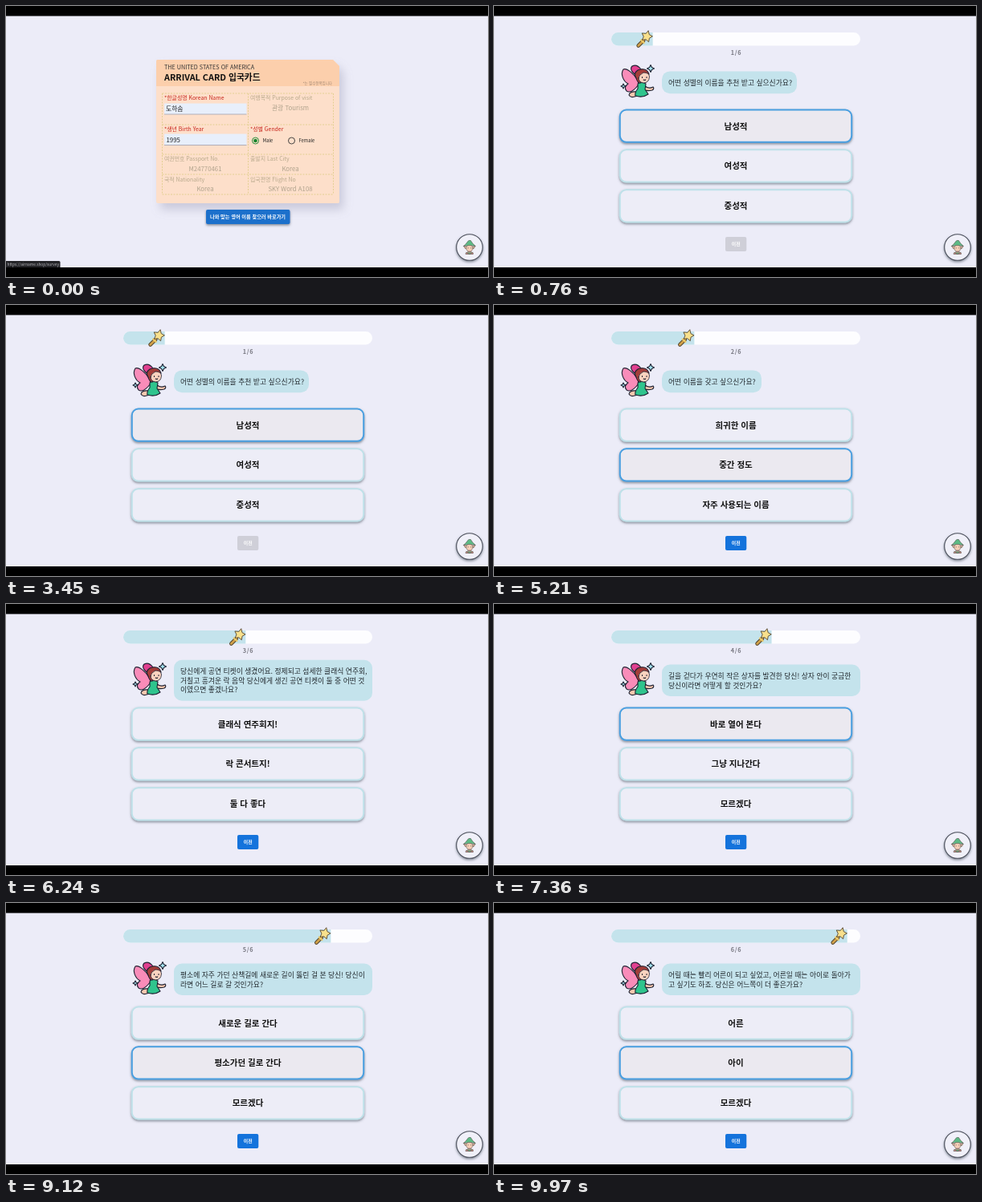
These frames come from a looping animation (600 px wide and 338 px high, 10 s). An HTML page:

```html
<!DOCTYPE html>
<html lang="ko">
<head>
<meta charset="utf-8">
<style>
  html, body { margin: 0; width: 100%; height: 100%; overflow: hidden; background: #000; }
  svg { display: block; width: 600px; height: 338px; font-family: "Noto Sans CJK KR", sans-serif; }
  .mid { text-anchor: middle; }
  .bold { font-weight: 700; }
  #card .label { font-size: 6.9px; fill: #b8a98c; }
  #card .need { fill: #c8261c; }
  #card .value { font-size: 7.8px; fill: #b0a28c; text-anchor: middle; }
  #card .typed { font-size: 7.8px; fill: #222; }
  .option rect { fill: #ededf7; stroke: #bfe1e9; stroke-width: 2; filter: url(#drop); }
  .option.hover rect { fill: #ebe9f0; stroke: #4a9fe0; }
  .option text { font-size: 10.5px; font-weight: 700; fill: #111; }
  #bubble text { font-size: 8.8px; fill: #22292e; }
  .ink { stroke: #1c2030; stroke-width: 1.1; stroke-linejoin: round; stroke-linecap: round; }
  #wand { stroke: #54452f; }
</style>
</head>
<body>
<svg viewBox="0 0 600 338">
  <defs>
    <filter id="drop" x="-10%" y="-30%" width="120%" height="170%">
      <feDropShadow dx="0" dy="1.6" stdDeviation="1.8" flood-color="#4a5560" flood-opacity=".65"/>
    </filter>
    <filter id="soft" x="-20%" y="-20%" width="140%" height="140%">
      <feDropShadow dx="5" dy="8" stdDeviation="6" flood-color="#8c8ca5" flood-opacity=".35"/>
    </filter>
    <clipPath id="track"><rect x="146" y="33" width="310" height="16.5" rx="8.2"/></clipPath>
  </defs>
  <rect y="12.5" width="600" height="313.5" fill="#ececf8"/>

  <g id="card">
    <path d="M189 67H407L415 75V244a2 2 0 0 1-2 2H189a2 2 0 0 1-2-2V69a2 2 0 0 1 2-2z" fill="#fddfca" filter="url(#soft)"/>
    <path d="M189 67H407L415 75V100H187V69a2 2 0 0 1 2-2z" fill="#fccfac"/>
    <path d="M194.5 109H407.5M194.5 148H407.5M194.5 185H407.5M194.5 210H407.5M194.5 235H407.5M194.5 109V235M301.5 109V235M407.5 109V235"
          fill="none" stroke="#dccb84" stroke-width=".8" stroke-dasharray="2 1.5"/>
    <text x="197" y="79" font-size="7.2" fill="#333">THE UNITED STATES OF AMERICA</text>
    <text x="197" y="92.5" font-size="10.8" class="bold" fill="#111">ARRIVAL CARD 입국카드</text>
    <text x="406" y="97.5" font-size="4.5" text-anchor="end" fill="#a08672">*는 필수항목입니다</text>
    <path d="M197 121.5h102.5v13.5H197zM197 159.5h102.5v14H197z" fill="#e8effb"/>
    <path d="M197 135h102.5M197 173.5h102.5" stroke="#a9a9b5" stroke-width=".9"/>
    <text class="typed" x="199" y="131.3">도하솜</text>
    <text class="typed" x="199.5" y="169.5">1995</text>
    <g fill="#fddfca" stroke="#333" stroke-width=".9">
      <circle cx="310.5" cy="168" r="4" stroke="#12852c"/>
      <circle cx="355.5" cy="168" r="4"/>
    </g>
    <circle cx="310.5" cy="168" r="2.3" fill="#12852c"/>
    <g font-size="5.8" fill="#222"><text x="319.5" y="170.3">Male</text><text x="364.5" y="170.3">Female</text></g>
    <rect x="249" y="254" width="104.5" height="18" rx="2" fill="#1a6fcb" filter="url(#drop)"/>
    <text x="301" y="265.3" class="mid bold" font-size="6.2" fill="#fff">나와 맞는 영어 이름 찾으러 바로가기</text>
    <path d="M0 318H66q1.5 0 1.5 1.5V326H0z" fill="#242428"/>
    <text x="1.5" y="323.8" font-size="4.8" fill="#b4b4b8">https://airname.shop/survey</text>
  </g>

  <g id="quiz">
    <g clip-path="url(#track)">
      <rect x="146" y="33" width="310" height="17" fill="#fdfdff"/>
      <rect id="fill" x="146" y="33" height="17" fill="#c4e3ec"/>
    </g>
    <g id="wand" class="ink">
      <path d="M-4 5L-10.5 11.5" stroke-width="4.6"/>
      <path d="M-4 5L-10.5 11.5" stroke="#d2a24a" stroke-width="2.6"/>
      <path d="M-7 4.500L-3.500 8" stroke="#eccb6a" stroke-width="2.2"/>
      <path id="star" fill="#f8e08c" stroke-width=".9"/>
    </g>
    <text id="count" class="mid bold" x="301.5" y="61" font-size="7.3" letter-spacing=".6" fill="#777780"></text>

    <g class="ink">
      <path d="M180 89C173 84 168 79 172 75Q178 72 183 79L185 88z" fill="#e0408f"/>
      <path d="M179 93C174 84 165 77 161 79C157 85 161 94 167 97Q161 101 165 106Q171 110 180 98z" fill="#f98cb9"/>
      <path d="M178 107Q169 106 168 111Q170 115 175 113L184 111" fill="#f8c9b0"/>
      <path d="M187 99Q192 104 198 101Q200 103 197 105Q189 107 184 103z" fill="#f8c9b0"/>
      <path d="M179 97Q184 94 189 97L188 104L192 110Q185 115 176 112Q175 108 179 103z" fill="#2fc48d"/>
      <path d="M177 90Q173 84 179 80Q190 76 193 85Q191 94 182 96Q178 95 177 90z" fill="#a43d3a"/>
      <path d="M180 90Q180 86 186 83Q193 83 193.500 88Q193 96 186 96Q180 95 180 90z" fill="#fbd3bf" stroke-width=".8"/>
    </g>
    <path d="M184.500 88.500v1M190 88.500v1M186.200 92q1.500 1 2.500 0" class="ink" fill="none" stroke-width=".9"/>
    <g class="ink" fill="#a5e4f0" stroke-width=".9">
      <path d="M195 73.5L196.400 76.6L199.500 78L196.400 79.4L195 82.5L193.600 79.4L190.500 78L193.600 76.6z"/>
      <path d="M161 97L162 99L164 100L162 101L161 103L160 101L158 100L160 99z"/>
    </g>

    <g id="bubble"><rect x="209" rx="10" fill="#c4e3ec"/></g>
    <g id="options"></g>
    <rect id="back" x="288" y="288" width="26.3" height="18" rx="2"/>
    <text x="301.2" y="299.2" class="mid bold" font-size="5.9" fill="#fff">이전</text>
  </g>

  <circle cx="577" cy="301" r="16.3" fill="#f0f0f9" stroke="#484c58" stroke-width="1.1" filter="url(#drop)"/>
  <g class="ink" style="stroke: #5b5350; stroke-width: .6">
    <path d="M572.500 308Q577 304.500 581.500 308V309.500H572.500z" fill="#d98a80"/>
    <path d="M573 300L570 299.500Q570.500 303 573.500 303zM581 300L584 299.500Q583.500 303 580.500 303z" fill="#f2c4ac"/>
    <circle cx="577" cy="302" r="4.2" fill="#f6cfb8"/>
    <path d="M569.500 299.500Q573 297 574 294.500Q576 291.500 578.500 292.500Q580 296 584.500 299.500Q577 297.500 569.500 299.500z" fill="#5cba85"/>
    <path d="M575.200 301.500v.6M578.800 301.500v.6"/>
    <path d="M573 307.500L577 309.500L581 307.500" fill="#62ad82"/>
  </g>
</svg>

<script>
const LOOP = 10000, STEP = 310 / 6, SLIDE = 600;

// hover: [start time, highlighted option], -1 for none
const questions = [
  { at: 300, width: 168, lines: ["어떤 성별의 이름을 추천 받고 싶으신가요?"],
    options: ["남성적", "여성적", "중성적"], hover: [[300, 2], [480, 1], [600, 0]] },
  { at: 4000, width: 124, lines: ["어떤 이름을 갖고 싶으신가요?"],
    options: ["희귀한 이름", "중간 정도", "자주 사용되는 이름"], hover: [[4000, 0], [4650, 1]] },
  { at: 5810, width: 247,
    lines: ["당신에게 공연 티켓이 생겼어요. 정제되고 섬세한 클래식 연주회,", "거칠고 흥겨운 락 음악 당신에게 생긴 공연 티켓이 둘 중 어떤 것", "이였으면 좋겠나요?"],
    options: ["클래식 연주회지!", "락 콘서트지!", "둘 다 좋다"], hover: [[5810, 1], [6150, -1], [6320, 0]] },
  { at: 7020, width: 247,
    lines: ["길을 걷다가 우연히 작은 상자를 발견한 당신! 상자 안이 궁금한", "당신이라면 어떻게 할 것인가요?"],
    options: ["바로 열어 본다", "그냥 지나간다", "모르겠다"], hover: [[7020, 0]] },
  { at: 8240, width: 247,
    lines: ["평소에 자주 가던 산책길에 새로운 길이 뚫린 걸 본 당신! 당신이", "라면 어느 길로 갈 것인가요?"],
    options: ["새로운 길로 간다", "평소가던 길로 간다", "모르겠다"], hover: [[8240, 0], [8950, 1]] },
  { at: 9730, width: 247,
    lines: ["어릴 때는 빨리 어른이 되고 싶었고, 어른일 때는 아이로 돌아가", "고 싶기도 하죠. 당신은 어느쪽이 더 좋은가요?"],
    options: ["어른", "아이", "모르겠다"], hover: [[9730, 1]] }
];

const $ = id => document.getElementById(id);

function add(parent, tag, attrs, text = "") {
  const el = document.createElementNS("http://www.w3.org/2000/svg", tag);
  for (const key in attrs) el.setAttribute(key, attrs[key]);
  el.textContent = text;
  return parent.appendChild(el);
}

// Labels of the card: x, y, class, text
[
  [197, 117.3, "label need", "*한글성명 Korean Name"], [304, 117.3, "label", "여행목적 Purpose of visit"],
  [197, 155.5, "label need", "*생년 Birth Year"], [304, 155.5, "label need", "*성별 Gender"],
  [197, 193.3, "label", "여권번호 Passport No."], [304, 193.3, "label", "출발지 Last City"],
  [197, 218.5, "label", "국적 Nationality"], [304, 218.5, "label", "입국편명 Flight No"],
  [354, 129.5, "value", "관광 Tourism"], [248, 205.7, "value", "M24770461"], [354, 205.7, "value", "Korea"],
  [248, 230.8, "value", "Korea"], [354, 230.8, "value", "SKY Word A108"]
].forEach(([x, y, cls, text]) => add($("card"), "text", { x, y, class: cls }, text));

const optionEls = [129.5, 179.3, 229.2].map(y => {
  const g = add($("options"), "g", { class: "option" });
  add(g, "rect", { x: 156.8, y, width: 288.4, height: 40.3, rx: 8 });
  return { g, text: add(g, "text", { x: 301, y: y + 24, class: "mid" }) };
});

const starPoints = Array.from({ length: 10 }, (_, i) => {
  const r = i % 2 ? 3.9 : 7.2, a = i * Math.PI / 5 - Math.PI / 4 - .5;
  return [r * Math.cos(a), r * Math.sin(a)].map(v => v.toFixed(2)).join(" ");
});
$("star").setAttribute("d", "M" + starPoints.join("L") + "z");

// CSS "ease" curve
function ease(x) {
  if (x >= 1) return 1;
  const bez = (a, b, s) => 3 * a * s * (1 - s) ** 2 + 3 * b * s * s * (1 - s) + s ** 3;
  let lo = 0, hi = 1;
  for (let i = 0; i < 20; i++) {
    const mid = (lo + hi) / 2;
    if (bez(.25, .25, mid) < x) lo = mid; else hi = mid;
  }
  return bez(.1, 1, lo);
}

function showQuestion(index) {
  const { lines, width, options } = questions[index], bubble = $("bubble");
  const height = 16.2 + 11.6 * lines.length, top = 95.3 - height / 2;
  const box = bubble.firstElementChild;
  box.setAttribute("y", top);
  box.setAttribute("width", width);
  box.setAttribute("height", height);
  bubble.replaceChildren(box);
  lines.forEach((line, i) => add(bubble, "text", { x: 217, y: top + 17.2 + 11.7 * i }, line));
  optionEls.forEach((option, i) => option.text.textContent = options[i]);
  $("count").textContent = `${index + 1}/6`;
  $("back").setAttribute("fill", index ? "#1473dc" : "#cfcfd8");
}

let shown = -1;
function render(time) {
  const index = questions.findLastIndex(q => time >= q.at);
  $("card").style.display = index < 0 ? "" : "none";
  $("quiz").style.display = index < 0 ? "none" : "";
  if (index !== shown && index >= 0) showQuestion(index);
  shown = index;
  if (index < 0) return;

  const { at, hover } = questions[index];
  const progress = index ? index + ease((time - at) / SLIDE) : 1;
  $("fill").setAttribute("width", progress * STEP);
  $("wand").setAttribute("transform", `translate(${146 + progress * STEP - 7.5} 38)`);
  const active = hover.findLast(h => time >= h[0])[1];
  optionEls.forEach((option, i) => option.g.classList.toggle("hover", i === active));
}

const start = performance.now();
function tick() {
  render((performance.now() - start) % LOOP);
  requestAnimationFrame(tick);
}
tick();
</script>
</body>
</html>
```
